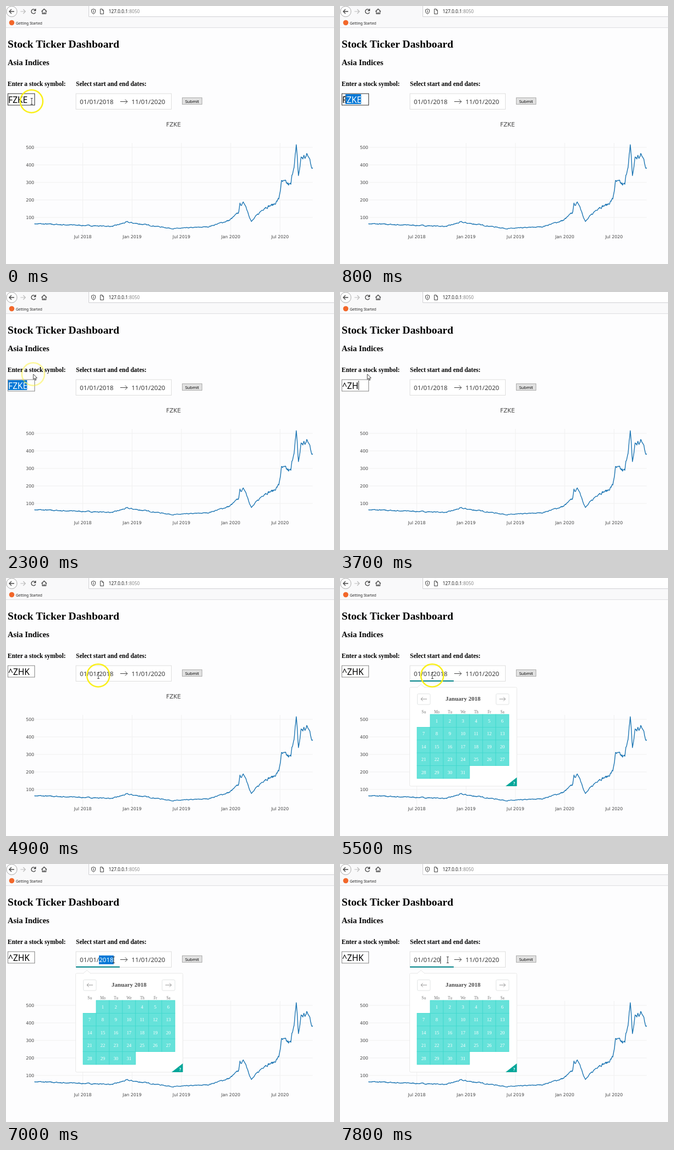
Write an HTML page that moves like this. It is 600 px wide and 471 px high and loops after 8000 ms.

```html
<!DOCTYPE html>
<html lang="en">
<head>
<meta charset="utf-8">
<title>Stock Ticker Dashboard</title>
<style>
  html, body { margin: 0; width: 100%; height: 100%; overflow: hidden; background: #fdfdfe; }
  svg { display: block; }
  text { white-space: pre; }
  .serif { font-family: "Liberation Serif", serif; }
  .bold { font-weight: bold; }
  .ui { font-family: "Noto Sans", sans-serif; }
  .plot { font: 7.9px "DejaVu Sans", sans-serif; fill: #444; }
  .symbol { font-size: 15.7px; }
  .date { font-size: 11.6px; fill: #3a3a3a; }
  .mid { text-anchor: middle; }
  .line { fill: none; stroke: #444; }
  .pale { stroke: #888; }
</style>
</head>
<body>
<svg width="600" height="471" viewBox="0 0 600 471">
  <defs>
    <clipPath id="symbolClip"><rect y="161" height="18"/></clipPath>
    <clipPath id="dateClip"><rect y="167" height="16"/></clipPath>
  </defs>

  <!-- browser bar -->
  <path fill="#f9f9fa" d="M0 0H600V39H0z"/>
  <path stroke="#dedee0" d="M0 39.5H600"/>
  <path fill="#fff" stroke="#d0d0d3" d="M610 -5H151.5V19.5H610z"/>
  <circle cx="10.5" cy="10" r="9.7" fill="#fcfcfc" stroke="#aaa"/>
  <path class="line" stroke-width="1.3" d="M15 10H6.5M10 6L6 10l4 4"/>
  <path fill="none" stroke="#bbb" stroke-width="1.2" d="M26.5 10H35M31.5 6l4 4-4 4"/>
  <path class="line" stroke-width="1.3" d="M53.5 7.5A4 4 0 1 0 54 11.5M54.3 5V8.5H50.8"/>
  <path class="line" stroke-width="1.3" d="M65 10l4.7-4.5L74.5 10M66.5 9.5V14H73V9.5M69.7 14V11"/>
  <path class="line" d="M160 5.5l3.5 1.3V10q0 3-3.5 4.5-3.5-1.5-3.5-4.5V6.8zM160 7.5v5"/>
  <path class="line" d="M172.5 5.5H176L178.5 8V14.5H172.5zM176 5.5V8H178.5"/>
  <text class="ui" x="187.7" y="13.2" font-size="8.4" fill="#222">127.0.0.1<tspan fill="#888">:8050</tspan></text>
  <circle cx="10.5" cy="30.5" r="4.8" fill="#f2672a"/>
  <text class="ui" x="18" y="33.5" font-size="6.7" fill="#222">Getting Started</text>

  <!-- page -->
  <g class="serif bold">
    <text x="3" y="76" font-size="19.65">Stock Ticker Dashboard</text>
    <text x="3" y="108" font-size="14.7">Asia Indices</text>
    <text x="3" y="146" font-size="11.45">Enter a stock symbol:</text>
    <text x="128" y="146" font-size="11.5">Select start and end dates:</text>
  </g>
  <rect id="inputBox" x="3.5" y="160" width="49" height="21" fill="#fff"/>
  <text id="symbol" class="ui symbol" x="4" y="176.7"></text>
  <g clip-path="url(#symbolClip)">
    <path fill="#0078d7" d="M0 161H60V179H0z"/>
    <text class="ui symbol" x="4" y="176.7" fill="#fff">FZKE</text>
  </g>
  <rect x="128" y="160" width="174.5" height="28.5" fill="#fff" stroke="#dedede"/>
  <text id="date" class="ui date" x="135" y="179"></text>
  <text class="ui date" x="229.5" y="179">11/01/2020</text>
  <g clip-path="url(#dateClip)">
    <path fill="#0078d7" d="M130 167H205V183H130z"/>
    <text class="ui date" x="135" y="179" style="fill:#fff">01/01/2018</text>
  </g>
  <path class="line" d="M209 174.500H222M218 170.500l4 4-4 4"/>
  <rect x="322.500" y="167.500" width="36" height="12" fill="#e1e1e1" stroke="#adadad"/>
  <text class="ui" x="327.700" y="176.500" font-size="7.600">Submit</text>

  <!-- chart -->
  <text class="plot mid" style="font-size:10.6px" x="306.500" y="219.700">FZKE</text>
  <g id="axes"></g>
  <path id="prices" fill="none" stroke="#1f77b4" stroke-width="1.4" stroke-linejoin="round"/>

  <!-- date picker -->
  <g id="calendar">
    <path fill="#008489" d="M128 187H208V189H128z"/>
    <rect x="127.500" y="199.500" width="196" height="180.500" rx="2" fill="#fff" stroke="#e9e9e9"/>
    <path fill="#fff" stroke="#ddd" stroke-width=".7" d="M141 200l7-6 7 6"/>
    <g fill="#fff" stroke="#e1e4e4">
      <rect x="141.500" y="211.500" width="23.500" height="19.500" rx="2"/>
      <rect x="285.500" y="211.500" width="23.500" height="19.500" rx="2"/>
    </g>
    <path class="line pale" stroke-width=".9" d="M159 221H148M151.500 217.500L148 221l3.500 3.500M291.500 221H302.500M299 217.500l3.500 3.500-3.500 3.500"/>
    <text class="serif bold mid" x="225" y="224.300" font-size="11" fill="#484848">January 2018</text>
    <g id="days" class="serif mid"></g>
    <path fill="#00a699" d="M323.500 364V380H303z"/>
    <text class="serif bold mid" x="318.500" y="378" font-size="8" fill="#fff">?</text>
  </g>

  <path id="caret" stroke="#222"/>
  <g id="pointer">
    <circle id="halo" cx="-.3" r="20.700" fill="none" stroke="#faf01c" stroke-width="2.600"/>
    <circle id="press" r="6" fill="none" stroke="#1b4f9c" stroke-width="1.600"/>
    <path id="beam" class="line" d="M-2-5.500H2M0-5.500V5.500M-2 5.500H2"/>
    <path id="arrow" fill="#fff" stroke="#333" stroke-width=".9" d="M0 0V9.500l2.200-2 1.600 3.600 1.600-.7-1.600-3.400H7z"/>
  </g>
</svg>
<script>
const $ = id => document.getElementById(id);
const show = (id, on) => { $(id).style.opacity = +on; };
const within = (t, from, to) => t >= from && t < to;
const lerp = (a, b, u) => a + (b - a) * u;

// Chart
const priceY = price => 418 - price * .32;
let axes = "";
for (let price = 100; price <= 500; price += 100) {
  const y = priceY(price);
  axes += `<path stroke="#f0f0f0" d="M52 ${y}H561"/>
    <text class="plot" text-anchor="end" x="51.5" y="${y + 3}">${price}</text>`;
}
["Jul 2018", "Jan 2019", "Jul 2019", "Jan 2020", "Jul 2020"].forEach((label, i) => {
  const x = 140.5 + 90.2 * i;
  axes += `<path stroke="#f0f0f0" d="M${x} 250V418"/><text class="plot mid" x="${x}" y="423.5">${label}</text>`;
});
$("axes").innerHTML = axes;

// The trend's turning points as [x, price]; seeded noise in proportion to the price adds the daily moves
const trend = [
  [52, 64], [195, 49], [221, 73], [306, 36], [370, 47], [409, 84], [425, 125], [428, 174], [437, 180], [449, 76],
  [473, 159], [489, 172], [499, 204], [504, 300], [521, 283], [531, 497], [535, 335], [540, 440], [552, 450], [561, 390]
];
let seed = 7, noise = 0, k = 0;
const random = () => (seed = seed * 16807 % 2147483647) / 2147483647 - .5;
const points = [];
for (let x = 52; x <= 561; x++) {
  while (x > trend[k + 1][0]) k++;
  const [x0, p0] = trend[k], [x1, p1] = trend[k + 1];
  const price = lerp(p0, p1, (x - x0) / (x1 - x0));
  noise = noise * .6 + random() * .08;
  points.push(`${x} ${priceY(price * (1 + noise)).toFixed(1)}`);
}
$("prices").setAttribute("d", "M" + points.join("L"));

// Calendar: the month starts on a Monday
let days = "";
["Su", "Mo", "Tu", "We", "Th", "Fr", "Sa"].forEach((name, i) => {
  days += `<text x="${153.2 + 24 * i}" y="246.5" font-size="7.3" fill="#757575">${name}</text>`;
});
for (let day = 1; day <= 31; day++) {
  const x = 141 + day % 7 * 24, y = 249 + Math.floor(day / 7) * 23.4;
  days += `<rect x="${x}" y="${y}" width="24" height="23.4" fill="#66e2da" stroke="#40d9cd" stroke-width=".8"/>
    <text x="${x + 12}" y="${y + 15}" font-size="8.7" fill="#fff">${day}</text>`;
}
$("days").innerHTML = days;

// Pointer stops as [time, x, y], eased in between
const route = [
  [0, 47, 174], [300, 47, 174], [900, 7, 170], [1600, 13, 166], [2100, 50, 150], [4200, 50, 150],
  [4500, 232, 184], [4800, 169, 178], [6300, 169, 178], [6900, 197, 175], [8000, 197, 175]
];
function pointerAt(t) {
  const i = route.findIndex(stop => stop[0] > t);
  const [t0, x0, y0] = route[i - 1], [t1, x1, y1] = route[i];
  const u = (t - t0) / (t1 - t0), eased = u * u * (3 - 2 * u);
  return [lerp(x0, x1, eased), lerp(y0, y1, eased)];
}

// The first key replaces the old text, then one key follows per step
function typeInto(id, t, { old, kept, keys, start, step }) {
  const count = Math.min(keys.length, Math.floor((t - start) / step) + 1);
  $(id).textContent = count > 0 ? kept + keys.slice(0, count) : old;
  return start + (count - 1) * step;
}
const symbolTyping = { old: "FZKE", kept: "", keys: "^ZHK", start: 2700, step: 400 };
const dateTyping = { old: "01/01/2018", kept: "01/01/", keys: "20", start: 7200, step: 400 };

function select(clip, from, to) {
  const rect = $(clip).firstElementChild;
  rect.setAttribute("x", from);
  rect.setAttribute("width", Math.max(0, to - from));
}

function draw(t) {
  const [x, y] = pointerAt(t);
  const symbolKey = typeInto("symbol", t, symbolTyping), dateKey = typeInto("date", t, dateTyping);
  $("inputBox").setAttribute("stroke", t < 2000 ? "#333" : "#888");
  select("symbolClip", t < 900 ? Math.max(4, x) : 4, within(t, 300, symbolTyping.start) ? 38.5 : 0);
  select("dateClip", 170, within(t, 6300, dateTyping.start) ? x : 0);

  const inDate = t >= dateTyping.start, field = $(inDate ? "date" : "symbol");
  const caretX = +field.getAttribute("x") + field.getComputedTextLength() + .5;
  $("caret").setAttribute("d", `M${caretX} ${inDate ? "168V182" : "162V179"}`);
  const blinkOn = Math.floor((t - (inDate ? dateKey : symbolKey)) / 530) % 2 === 0;
  show("caret", blinkOn && (inDate || within(t, symbolTyping.start, 5300)));
  show("calendar", t >= 5300);

  $("pointer").setAttribute("transform", `translate(${x} ${y})`);
  const arrow = within(t, 1800, 4300);
  show("arrow", arrow);
  show("beam", !arrow);
  show("press", within(t, 300, 500) || within(t, 5200, 5400) || within(t, 6100, 6500));
  const moving = t < 300 || within(t, 1700, 2200) || within(t, 4200, 5200) || within(t, 5400, 6000);
  const fading = within(t, 2200, 2500) ? (2500 - t) / 450 : 0;
  show("halo", moving || fading);
}

// The screen advances ten times a second
function tick() {
  draw(Math.floor(performance.now() % 8000 / 100) * 100);
  requestAnimationFrame(tick);
}
tick();
</script>
</body>
</html>
```
